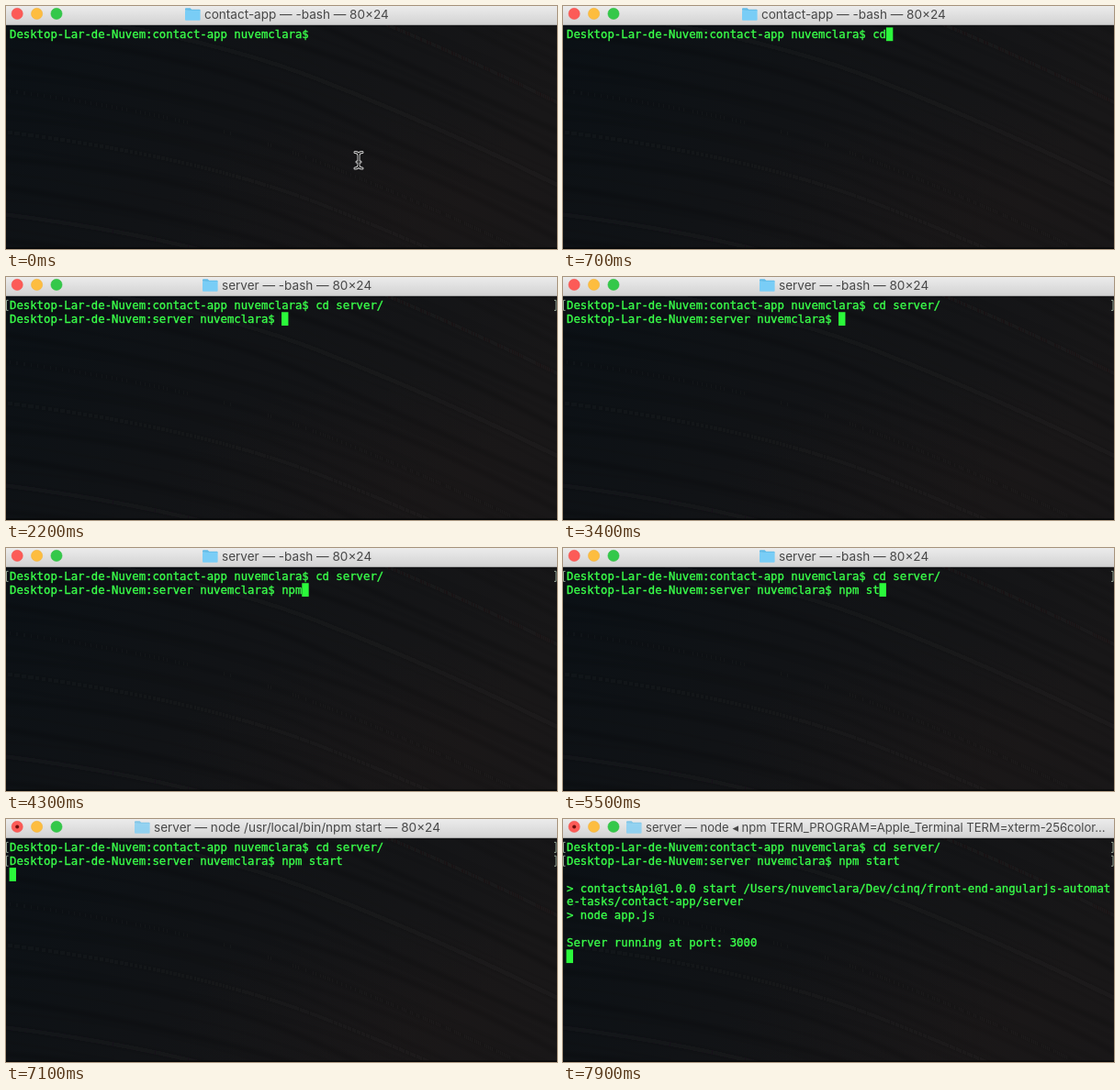
An HTML page that plays this animation: 600x265 px, repeating every 8000 ms.

```html
<!DOCTYPE html>
<html lang="en">
<head>
<meta charset="utf-8">
<title>Terminal</title>
<style>
  html, body { margin: 0; width: 100%; height: 100%; overflow: hidden; background: #0d1014; }
  svg { display: block; width: 600px; height: 265px; }
  text { white-space: pre; }
  #rows { font: 12.31px "DejaVu Sans Mono", monospace; fill: #3aff4a; stroke: #3aff4a; stroke-width: 0.35px; }
  #title { font-family: Inter, Roboto, sans-serif; fill: #484848; }
</style>
</head>
<body>
<svg viewBox="0 0 600 265">
  <defs>
    <linearGradient id="base" x1="0" y1="0" x2="1" y2="0.35">
      <stop offset="0" stop-color="#0a1015"/>
      <stop offset="0.5" stop-color="#111316"/>
      <stop offset="1" stop-color="#181718"/>
    </linearGradient>
    <radialGradient id="glow" cx="0.75" cy="0.85" r="0.45">
      <stop offset="0" stop-color="#241a19" stop-opacity="0.2"/>
      <stop offset="1" stop-color="#241a19" stop-opacity="0"/>
    </radialGradient>
    <linearGradient id="bar" x1="0" y1="0" x2="0" y2="1">
      <stop offset="0" stop-color="#ececec"/>
      <stop offset="1" stop-color="#d2d2d2"/>
    </linearGradient>
    <filter id="soft" x="-10%" y="-10%" width="120%" height="120%">
      <feGaussianBlur stdDeviation="2"/>
    </filter>
  </defs>

  <rect width="600" height="265" fill="url(#base)"/>
  <rect width="600" height="265" fill="url(#glow)"/>
  <g id="streaks" fill="none" filter="url(#soft)"></g>
  <rect y="263.5" width="600" height="1.5" fill="#050607"/>

  <rect width="600" height="20.5" fill="url(#bar)"/>
  <rect y="20" width="600" height="1" fill="#a9a9a9"/>
  <g stroke-width="0.5">
    <circle cx="12.2" cy="8.4" r="6.1" fill="#fc5b57" stroke="#ee514d"/>
    <circle cx="33.6" cy="8.4" r="6.1" fill="#fdbd3f" stroke="#eeae39"/>
    <circle cx="55" cy="8.4" r="6.1" fill="#34c84a" stroke="#2fbb41"/>
  </g>
  <circle id="busy" cx="12.2" cy="8.4" r="2" fill="#6e0f0c"/>
  <g id="folder">
    <path d="M0 4.2V2.6Q0 1.6 1 1.6H5.6L7.2 3.1H15.6Q16.6 3.1 16.6 4.1V5Z" fill="#62bce8"/>
    <rect y="4.2" width="16.6" height="11" rx="1" fill="#79cdf6"/>
  </g>
  <text id="title" y="13.6"></text>

  <g id="rows"></g>
  <g id="marks" fill="none" stroke="#98a898" stroke-width="1"></g>
  <rect id="cursor" width="7.4" height="14.8" fill="#2bf93b"/>
  <g id="pointer" fill="none" stroke-linecap="round">
    <path id="beam" d="M380 159.5Q384 159.5 384 163Q384 159.5 388 159.5M384 162V174M380 177Q384 177 384 173.5Q384 177 388 177M382 170H386"/>
    <use href="#beam" stroke="#d8d8d8" stroke-width="3"/>
    <use href="#beam" stroke="#101010" stroke-width="1.2"/>
  </g>
</svg>
<script>
const LOOP = 8000, LEFT = 4, CHAR = 7.411, PITCH = 14.86, TOP = 23.4, BLINK = 600;
const HOST = "Desktop-Lar-de-Nuvem", USER = "nuvemclara";
const prompt = dir => `${HOST}:${dir} ${USER}$ `;
const $ = id => document.getElementById(id);

function add(parent, tag, attrs) {
  const el = document.createElementNS("http://www.w3.org/2000/svg", tag);
  for (const key in attrs) el.setAttribute(key, attrs[key]);
  return parent.appendChild(el);
}

// Each entry: start time, value from then on.
const latest = (steps, t) => steps.reduce((found, step) => step[0] <= t ? step : found);

const cdTyping = [[-900, ""], [600, "c"], [700, "cd"], [900, "cd "], [1000, "cd s"],
  [1200, "cd se"], [1400, "cd ser"], [1700, "cd serv"], [1800, "cd server/"]];
const npmTyping = [[2100, ""], [3800, "n"], [4000, "np"], [4200, "npm"], [4700, "npm "],
  [5000, "npm s"], [5300, "npm st"], [5700, "npm sta"], [5900, "npm star"], [6100, "npm start"]];
const CD_ENTER = 1900, PROMPT = 2100, NPM_ENTER = 6300, BUSY = 6500, OUTPUT = 7300, READY = 7800;

// Start time, text, left edge, font size.
const titles = [
  [0, "contact-app — -bash — 80×24", 195, 13.55],
  [PROMPT, "server — -bash — 80×24", 214, 13.55],
  [BUSY, "server — node /usr/local/bin/npm start — 80×24", 140, 13.55],
  [7400, "server — node ◂ npm TERM_PROGRAM=Apple_Terminal TERM=xterm-256color…", 69, 13.05]
];
const startLog = ["",
  `> contactsApi@1.0.0 start /Users/${USER}/Dev/cinq/front-end-angularjs-automat`,
  "e-tasks/contact-app/server", "> node app.js", ""];

for (let i = 0; i < 30; i++) {
  const y = -180 + i * 15, bend = 25 + 10 * Math.sin(i * 2.1);
  add($("streaks"), "path", {
    d: `M-20 ${y}Q200 ${y + bend} 340 ${y + 80}T620 ${y + 205}`,
    stroke: i % 3 ? "#06090b" : "#222021",
    "stroke-width": 2 + 3 * Math.abs(Math.sin(i * 1.7)),
    opacity: 0.14 + 0.08 * Math.sin(i * 3.3)
  });
}

const rows = Array.from({ length: 9 }, (_, i) =>
  add($("rows"), "text", { x: LEFT, y: 35 + i * PITCH }));
const marks = [0, 1].map(i => {
  const y = TOP + 2 + i * PITCH;
  return add($("marks"), "path", { d: `M2.5 ${y}H0.5V${y + 11}H2.5M597 ${y}H599V${y + 11}H597` });
});

const show = (el, on) => el.setAttribute("visibility", on ? "visible" : "hidden");
const setText = (el, text) => { if (el.textContent !== text) el.textContent = text; };

function screen(t) {
  const cd = latest(cdTyping, t), lines = [prompt("contact-app") + cd[1]];
  let changed = cd[0];
  if (t >= PROMPT) {
    const npm = latest(npmTyping, t);
    lines.push(prompt("server") + npm[1]);
    changed = npm[0];
  }
  if (t >= NPM_ENTER) { lines.push(""); changed = NPM_ENTER; }
  if (t >= BUSY) changed = 7000;
  if (t >= OUTPUT) { lines.splice(2, 1, ...startLog, ""); changed = OUTPUT; }
  if (t >= READY) { lines.splice(7, 1, "Server running at port: 3000", ""); changed = READY; }
  return { lines, changed };
}

function draw(t) {
  const { lines, changed } = screen(t);
  rows.forEach((row, i) => setText(row, lines[i] || ""));
  show(marks[0], t >= CD_ENTER);
  show(marks[1], t >= NPM_ENTER);

  const last = lines.length - 1;
  $("cursor").setAttribute("x", LEFT + lines[last].length * CHAR - 0.4);
  $("cursor").setAttribute("y", TOP + last * PITCH);
  const waiting = t >= CD_ENTER && t < PROMPT;
  show($("cursor"), !waiting && Math.floor((t - changed) / BLINK) % 2 === 0);

  const [, title, x, size] = latest(titles, t);
  setText($("title"), title);
  $("title").setAttribute("x", x + 21);
  $("title").setAttribute("font-size", size);
  $("folder").setAttribute("transform", `translate(${x} 0.6)`);
  $("folder").setAttribute("opacity", t >= BUSY ? 0.75 : 1);
  show($("busy"), t >= BUSY);
  show($("pointer"), t < 600);
}

const start = performance.now();
function tick(now) {
  draw(Math.max(0, now - start) % LOOP);
  requestAnimationFrame(tick);
}
draw(0);
requestAnimationFrame(tick);
</script>
</body>
</html>
```
